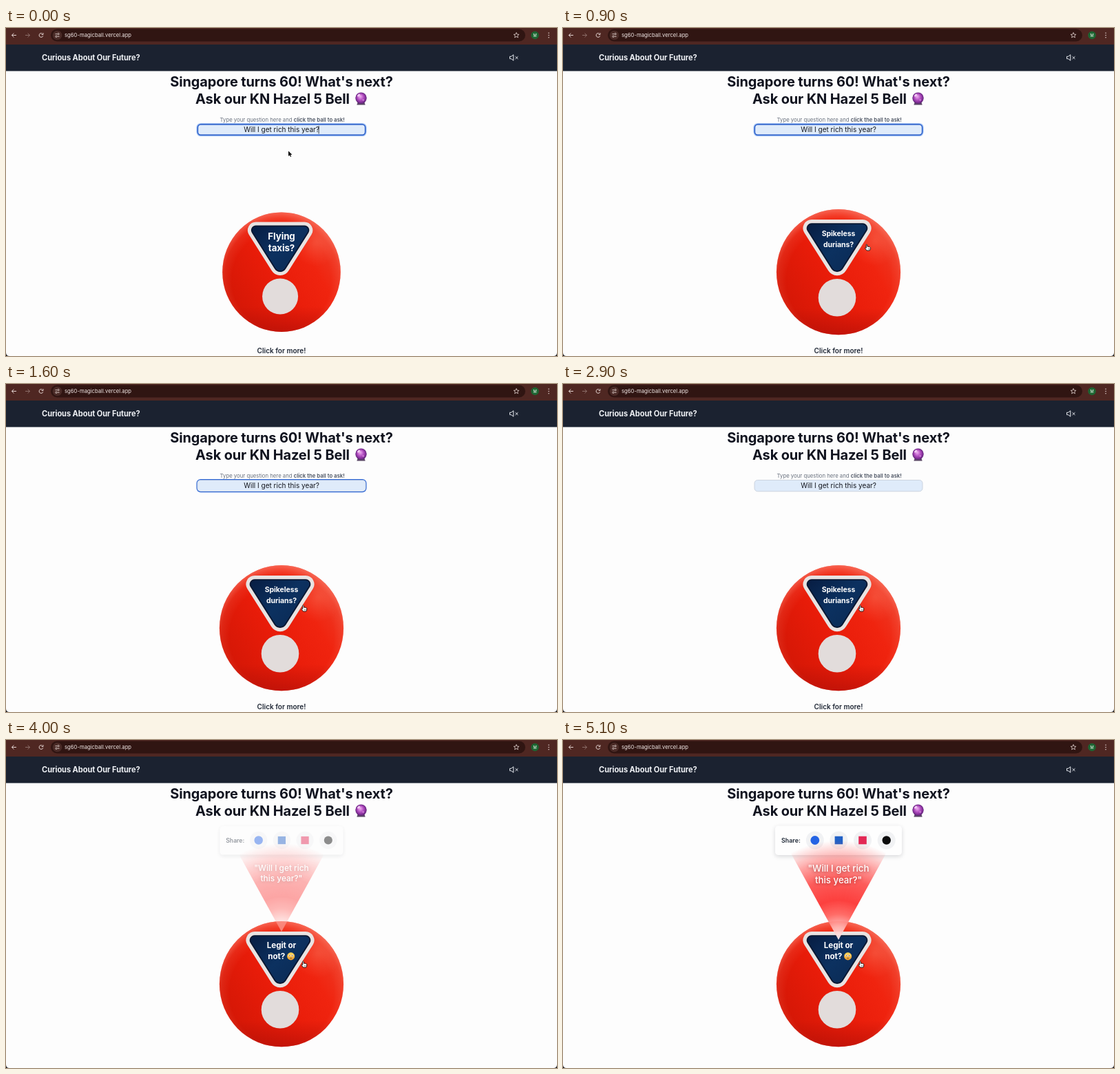
An HTML page with a canvas for the animation above (5.2 s loop, 800 px wide and 476 px high).

```html
<!DOCTYPE html>
<html lang="en">
<head>
<meta charset="utf-8">
<title>Curious About Our Future?</title>
<style>
html, body { margin: 0; width: 100%; height: 100%; overflow: hidden; background: #fdfdfd; }
canvas { display: block; width: 800px; height: 476px; }
</style>
</head>
<body>
<canvas id="stage"></canvas>
<script>
const LOOP = 5200;
const dpr = window.devicePixelRatio || 1;

function sized(canvas) {
  canvas.width = 800 * dpr;
  canvas.height = 476 * dpr;
  return canvas.getContext('2d');
}
const main = sized(document.getElementById('stage'));
const spare = sized(document.createElement('canvas'));
let g = main;

const clamp = v => Math.max(0, Math.min(1, v));
const span = (t, a, b) => clamp((t - a) / (b - a));
const smooth = p => p * p * (3 - 2 * p);
const easeOut = p => 1 - (1 - p) * (1 - p);
const mix = (a, b, p) => a + (b - a) * p;

// y is the middle of the capital letters
function text(str, x, y, size, weight, color, align = 'center') {
  g.font = `${weight} ${size}px Inter, sans-serif`;
  g.letterSpacing = weight > 600 ? `${-0.007 * size}px` : '0px';
  g.textAlign = align;
  g.fillStyle = color;
  g.fillText(str, x, y + size * 0.36);
  return g.measureText(str).width;
}

function disc(x, y, r, color) {
  g.beginPath();
  g.arc(x, y, r, 0, Math.PI * 2);
  g.fillStyle = color;
  g.fill();
}

function box(x, y, w, h, r, color) {
  g.beginPath();
  g.roundRect(x, y, w, h, r);
  if (color) { g.fillStyle = color; g.fill(); }
}

function line(points, color, width) {
  g.beginPath();
  points.forEach(([x, y], i) => i ? g.lineTo(x, y) : g.moveTo(x, y));
  g.strokeStyle = color;
  g.lineWidth = width;
  g.stroke();
}

function ramp(gradient, stops) {
  stops.forEach(([at, color]) => gradient.addColorStop(at, color));
  return gradient;
}

function place(draw, x, y, scale = 1) {
  g.save();
  g.translate(x, y);
  g.scale(scale, scale);
  draw();
  g.restore();
}

// Paints a group apart, then fades it as a whole
function fade(draw, alpha) {
  if (alpha <= 0) return;
  g = spare;
  g.setTransform(dpr, 0, 0, dpr, 0, 0);
  g.clearRect(0, 0, 800, 476);
  draw();
  g = main;
  g.globalAlpha = alpha;
  g.drawImage(spare.canvas, 0, 0, 800, 476);
  g.globalAlpha = 1;
}

function browserBar() {
  const ink = '#e3d3d0';
  g.fillStyle = '#4f2722';
  g.fillRect(0, 0, 800, 24);
  box(65, 1.5, 689, 18, 9, '#301512');
  line([[15, 10.5], [8.5, 10.5]], ink, 1);
  line([[11.4, 7.5], [8.4, 10.5], [11.4, 13.5]], ink, 1);
  line([[28, 10.5], [34.5, 10.5]], '#8c6e69', 1);
  line([[31.6, 7.5], [34.6, 10.5], [31.6, 13.5]], '#8c6e69', 1);

  g.beginPath();
  g.arc(51, 10.5, 2.9, 0.3, 5.4);
  g.strokeStyle = ink;
  g.lineWidth = 1;
  g.stroke();
  line([[54, 7.2], [54, 9.5], [51.6, 9.5]], ink, 1);

  disc(74.5, 10.5, 6.8, '#4a2b27');
  line([[71.5, 8.7], [74.2, 8.7]], ink, 0.9);
  line([[74.8, 12.3], [77.5, 12.3]], ink, 0.9);
  [[76, 8.7], [73, 12.3]].forEach(([x, y]) => {
    g.beginPath();
    g.arc(x, y, 1.2, 0, 7);
    g.lineWidth = 0.8;
    g.stroke();
  });
  text('sg60-magicball.vercel.app', 85, 10.4, 7.7, 400, '#f1e7e5', 'left');

  const star = [];
  for (let i = 0; i <= 10; i++) {
    const a = i * Math.PI / 5 - Math.PI / 2, r = i % 2 ? 1.8 : 4.1;
    star.push([741 + r * Math.cos(a), 10.6 + r * Math.sin(a)]);
  }
  line(star, ink, 0.8);
  disc(768, 10.5, 5.7, '#1d6532');
  text('M', 768, 10.5, 5.6, 500, '#dcebdd');
  [7.3, 10.5, 13.7].forEach(y => disc(788, y, 0.8, ink));
}

function header() {
  g.fillStyle = '#1b2230';
  g.fillRect(0, 24, 800, 38.5);
  text('Curious About Our Future?', 52, 43, 11.1, 700, '#eef0f4', 'left');
  line([[731.5, 41.3], [733.6, 41.3], [736.8, 38.8], [736.8, 47.2],
    [733.6, 44.7], [731.5, 44.7], [731.5, 41.3]], '#e8ebf0', 1);
  line([[739.6, 41.3], [743.4, 45]], '#e8ebf0', 1);
  line([[743.4, 41.3], [739.6, 45]], '#e8ebf0', 1);
}

function crystal() {
  g.beginPath();
  g.moveTo(511, 107);
  g.lineTo(520, 107);
  g.lineTo(521.6, 111.6);
  g.lineTo(509.4, 111.6);
  g.fillStyle = '#3f2c49';
  g.fill();
  line([[510, 110], [521, 110]], '#7a5f8a', 1);
  disc(515.5, 101.6, 8.2, ramp(g.createRadialGradient(514, 99, 1, 515.5, 101.6, 8.2), [
    [0, '#e7a3ea'], [0.45, '#b653c4'], [0.8, '#843099'], [1, '#5f2478']]));
  g.beginPath();
  g.ellipse(512, 97.6, 2.4, 1.4, -0.7, 0, 7);
  g.fillStyle = 'rgba(255,235,255,.75)';
  g.fill();
  disc(518.7, 104.5, 1.2, 'rgba(244,170,245,.6)');
}

function title() {
  text("Singapore turns 60! What's next?", 400, 78, 20, 700, '#10131f');
  text('Ask our KN Hazel 5 Bell', 275, 103, 20, 700, '#10131f', 'left');
  crystal();
}

function question(t) {
  const w = text('Type your question here and ', 310.5, 133, 7.78, 400, '#69717e', 'left');
  text('click the ball to ask!', 310.5 + w, 133, 7.78, 600, '#4a5261', 'left');

  box(278, 139.5, 244, 16.3, 4.5, '#dfebfa');
  g.strokeStyle = '#c3ccd8';
  g.lineWidth = 0.8;
  g.stroke();
  const ring = 1 - span(t, 1500, 1750);
  if (t < 1500) {
    box(277.2, 138.8, 245.6, 17.7, 5.5);
    g.strokeStyle = '#9fc0f4';
    g.lineWidth = 1.6;
    g.stroke();
    box(278.4, 140, 243.2, 15.3, 4.5);
    g.strokeStyle = '#2459c7';
    g.lineWidth = 1.5;
    g.stroke();
  } else if (ring > 0) {
    box(277, 138.6, 246, 18, 5.5);
    g.strokeStyle = '#2c66d6';
    g.lineWidth = 1.2 * Math.sqrt(ring) + 0.2;
    g.stroke();
  }
  text('Will I get rich this year?', 400, 147.6, 10, 400, '#12151c');
  if (t < 1500 && t % 1000 < 500) {
    g.fillStyle = '#161a22';
    g.fillRect(453.7, 142, 0.8, 11.5);
  }
}

function pane() {
  g.beginPath();
  g.moveTo(-2, -70);
  g.arcTo(50.5, -70, -1.9, 12.9, 9.5);
  g.arcTo(-1.9, 12.9, -54.3, -70, 12);
  g.arcTo(-54.3, -70, -2, -70, 9.5);
  g.closePath();
  g.fillStyle = ramp(g.createLinearGradient(-40, -70, 30, 5), [
    [0, '#071d42'], [0.5, '#0c3160'], [1, '#0a2952']]);
  g.fill();
  g.save();
  g.clip();
  g.strokeStyle = '#061631';
  g.lineWidth = 8.5;
  g.stroke();
  g.restore();
  g.strokeStyle = '#e8e3e2';
  g.lineWidth = 5;
  g.stroke();
}

function face(x, y) {
  disc(x, y, 5.3, ramp(g.createLinearGradient(0, y - 5, 0, y + 5), [
    [0, '#ffd958'], [1, '#e99a31']]));
  [-1.9, 1.9].forEach(d => {
    disc(x + d, y - 0.9, 1.4, '#fff');
    disc(x + d, y - 0.9, 0.7, '#4a2b18');
  });
  line([[x - 1.4, y + 2.7], [x + 1.4, y + 2.7]], '#73401c', 0.8);
}

function ball(t) {
  g.beginPath();
  g.ellipse(0, 0.2, 85.8, 86.8, 0, 0, 7);
  g.fillStyle = ramp(g.createLinearGradient(-75, 45, 75, -45), [
    [0, '#d41706'], [0.4, '#e81c09'], [0.75, '#f0240f'], [1, '#ee3a25']]);
  g.fill();
  g.fillStyle = ramp(g.createRadialGradient(0, 12, 72, 0, 6, 95), [
    [0, 'rgba(255,130,110,0)'], [0.5, 'rgba(255,130,110,.14)'], [1, 'rgba(255,165,150,.6)']]);
  g.fill();
  g.fillStyle = ramp(g.createLinearGradient(0, 50, 0, 87), [
    [0, 'rgba(165,12,8,0)'], [1, 'rgba(165,12,8,.5)']]);
  g.fill();
  g.fillStyle = ramp(g.createRadialGradient(50, -42, 2, 50, -42, 34), [
    [0, 'rgba(255,130,105,.32)'], [1, 'rgba(255,110,90,0)']]);
  g.fill();

  pane();
  disc(-1.9, 35.5, 26, '#e2dcdb');
  if (t < 400) {
    text('Flying', 0, -52, 13.3, 700, '#fff');
    text('taxis?', 0, -34.6, 13.3, 700, '#fff');
  } else if (t < 3600) {
    text('Spikeless', 0, -53.4, 10, 700, '#fff');
    text('durians?', 0, -38.2, 10, 700, '#fff');
  } else {
    text('Legit or', 0, -53.4, 11.1, 700, '#fff');
    text('not?', -7, -38.2, 11.1, 700, '#fff');
    face(13, -38.2);
  }
}

// Light spreads in rings from the tip at y = 110
function beam() {
  g.beginPath();
  g.moveTo(0, 110);
  g.lineTo(-82.5, -40);
  g.lineTo(82.5, -40);
  g.closePath();
  g.fillStyle = ramp(g.createRadialGradient(0, 110, 0, 0, 110, 144), [
    [0, 'rgba(255,245,244,.95)'], [0.13, 'rgba(255,185,182,.92)'],
    [0.26, 'rgba(255,95,90,.92)'], [0.4, 'rgba(252,52,50,.94)'],
    [0.62, 'rgba(252,56,54,.82)'], [0.8, 'rgba(255,66,64,.48)'], [1, 'rgba(255,80,80,0)']]);
  g.fill();
}

function asked() {
  g.save();
  g.shadowColor = 'rgba(110,20,20,.6)';
  g.shadowBlur = 5 * dpr;
  g.shadowOffsetY = dpr;
  text('"Will I get rich', 0, 6, 13.3, 500, '#fff');
  text('this year?"', 0, 23.6, 13.3, 500, '#fff');
  g.restore();
}

function share() {
  g.save();
  g.shadowColor = 'rgba(20,25,40,.16)';
  g.shadowBlur = 6 * dpr;
  g.shadowOffsetY = 2 * dpr;
  box(-92, -21.5, 184, 42.5, 4.5, '#fefefe');
  g.restore();

  text('Share:', -83, -0.5, 8.9, 600, '#1f2937', 'left');
  [-34.2, 0.4, 35, 69.7].forEach(x => disc(x, -0.5, 13, '#f1f2f4'));
  disc(-34.2, -0.5, 6.4, '#2463e4');
  box(-5.4, -6.3, 11.6, 11.6, 0, '#2261c6');
  box(29.2, -6.3, 11.6, 11.6, 0, '#e32855');
  disc(69.7, -0.5, 6.2, '#0b0b0c');
}

function arrow() {
  g.lineJoin = 'round';
  line([[0, -3.6], [0, 4], [1.8, 2.4], [3, 5.1], [4.2, 4.6], [3.1, 2], [5.4, 1.8], [0, -3.6]],
    '#fff', 1.5);
  g.fillStyle = '#0c0c0c';
  g.fill();
}

function hand() {
  g.beginPath();
  g.moveTo(-2.4, -4);
  g.quadraticCurveTo(-1.5, -5.2, -0.8, -3.9);
  g.lineTo(-0.6, -1.3);
  g.quadraticCurveTo(3.6, -1.6, 3.8, 0.5);
  g.quadraticCurveTo(4, 3, 2.6, 4.5);
  g.lineTo(-1.5, 4.5);
  g.quadraticCurveTo(-3, 2.6, -4.2, 0.8);
  g.quadraticCurveTo(-3.6, -0.4, -2.2, 0.9);
  g.closePath();
  g.fillStyle = '#fff';
  g.fill();
  g.strokeStyle = '#111';
  g.lineWidth = 0.9;
  g.stroke();
  line([[0.6, 1.2], [0.6, 3]], '#333', 0.6);
  line([[2, 1.2], [2, 3]], '#333', 0.6);
}

function pointer(t) {
  const stops = [[100, 410, 182], [600, 451, 323], [1100, 438, 316], [1600, 433, 325.5]];
  let [, x, y] = stops[0];
  for (let i = 1; i < stops.length; i++) {
    const p = smooth(span(t, stops[i - 1][0], stops[i][0]));
    x = mix(x, stops[i][1], p);
    y = mix(y, stops[i][2], p);
  }
  place(Math.hypot(x - 400, y - 354) < 88 ? hand : arrow, x, y);
}

function corners() {
  g.fillStyle = '#15161b';
  [[0, 1], [800, -1]].forEach(([x, d]) => {
    g.beginPath();
    g.moveTo(x, 476);
    g.lineTo(x, 471);
    g.quadraticCurveTo(x, 476, x + 5 * d, 476);
    g.fill();
  });
}

function draw(t) {
  g.setTransform(dpr, 0, 0, dpr, 0, 0);
  g.fillStyle = '#fdfdfd';
  g.fillRect(0, 0, 800, 476);
  browserBar();
  header();
  title();

  fade(() => {
    question(t);
    text('Click for more!', 400, 468.3, 10, 600, '#1f2735');
  }, 1 - span(t, 3580, 3780));

  const grow = 1 + 0.05 * easeOut(span(t, 380, 680));
  const sway = 1.6 * Math.sin(Math.PI * span(t, 400, 800));
  place(() => ball(t), 400 + sway, 354, grow);

  const p = easeOut(span(t, 3600, 5100));
  fade(() => place(share, 400, 146, mix(0.95, 1, p)), p);
  fade(() => place(() => { beam(); asked(); }, 400, 180, mix(0.8, 1, p)), p);

  pointer(t);
  corners();
}

const start = performance.now();
function tick() {
  draw((performance.now() - start) % LOOP);
  requestAnimationFrame(tick);
}
tick();
</script>
</body>
</html>
```
